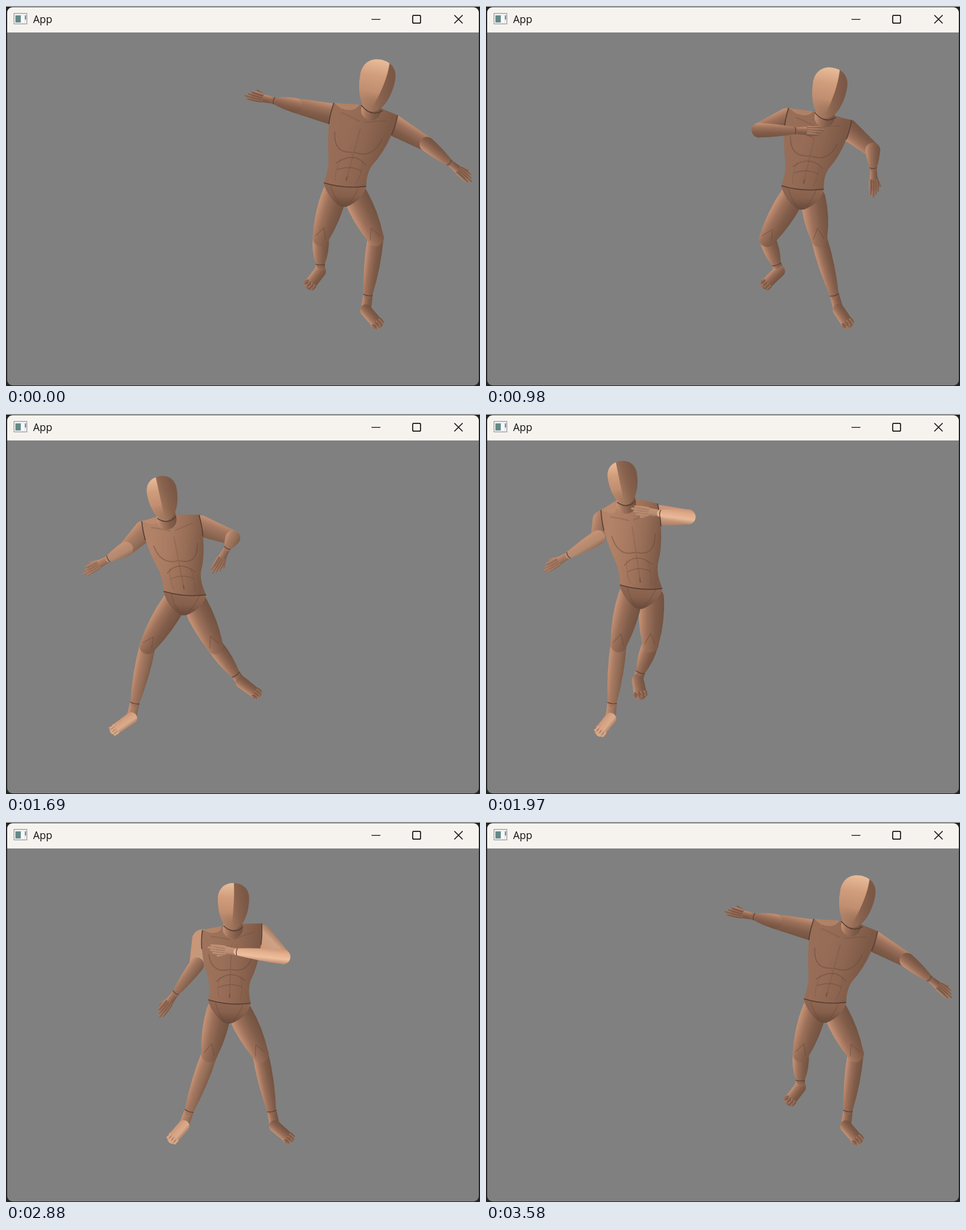
These frames come from a looping animation (804 px wide and 646 px high, 3650 ms). An HTML page with a canvas:

```html
<!DOCTYPE html>
<html lang="en">
<head>
<meta charset="utf-8">
<title>App</title>
<style>
  html, body { margin: 0; height: 100%; overflow: hidden; background: #242424; }
  canvas { display: block; }
</style>
</head>
<body>
<canvas id="stage" width="804" height="646"></canvas>
<script>
const ctx = document.getElementById('stage').getContext('2d');
const LOOP = 3650, DANCE = 3580;
const KEY_TIMES = [0, 980, 1410, 1970, 2530, 3160];

const mix = (a, b, k) => [a[0] + (b[0] - a[0]) * k, a[1] + (b[1] - a[1]) * k];
const shift = (p, x, y) => [p[0] + x, p[1] + y];
const clamp = k => Math.max(0, Math.min(1, k));
const direction = (a, b) => {
  const dx = b[0] - a[0], dy = b[1] - a[1], len = Math.hypot(dx, dy) || 1;
  return [dx / len, dy / len, len];
};

// Monotone cubic interpolation around the dance
function sample(values, time) {
  const n = values.length, t = time % DANCE;
  const wrap = i => (i + n) % n;
  const span = i => (KEY_TIMES[wrap(i + 1)] - KEY_TIMES[wrap(i)] + DANCE) % DANCE;
  const rise = i => (values[wrap(i + 1)] - values[wrap(i)]) / span(i);
  const slope = i => {
    const p = rise(i - 1), q = rise(i);
    return p * q > 0 ? 2 * p * q / (p + q) : 0;
  };
  const i = KEY_TIMES.findLastIndex(k => k <= t), h = span(i), k = (t - KEY_TIMES[i]) / h;
  return values[i] + rise(i) * h * k * k * (3 - 2 * k)
    + h * k * (1 - k) * ((1 - k) * slope(i) - k * slope(i + 1));
}

// Only the free joints are keyed; the rest of the body follows from them.
function poseAt(t) {
  const at = (...values) => sample(values, t);
  const chin = [at(619, 574, 347, 238, 286, 486), at(179, 191, 208, 154, 177, 185)];
  const hips = [at(575, 537, 381, 263, 301, 461), 232 + .4 * chin[1]];
  const elbowL = [at(490, 463, 236, 190, 254, 389), at(169, 211, 249, 210, 232, 247)];
  const wristL = [at(455, 524, 250, 140, 215, 355), at(161, 212, 252, 240, 268, 300)];
  const elbowR = [at(714, 656, 468, 343, 362, 588), at(235, 245, 246, 175, 205, 240)];
  const wristR = [at(752, 657, 505, 296, 294, 527), at(266, 275, 286, 169, 200, 238)];
  const kneeX = [at(534, 477, 277, 225, 298, 393), at(627, 565, 468, 279, 302, 552)];
  const ankleX = [at(533, 493, 231, 214, 299, 322), at(614, 591, 543, 262, 262, 597)];

  const lean = chin[0] - hips[0], right = chin[0] - 238;
  const chest = [hips[0] + .8 * lean, 50 + .7 * chin[1]];
  const half = 48 + .016 * right, tilt = 16 * clamp((chin[0] - 480) / 90) - 5.5;
  const hand = (elbow, wrist) => {
    const [dx, dy] = direction(elbow, wrist);
    return shift(wrist, dx * 49, dy * 49);
  };
  // The trailing foot leaves the floor as the weight moves away from it.
  const lift = [clamp((hips[0] - 470) / 60), clamp((345 - hips[0]) / 45)];
  const ankles = ankleX.map((x, i) => [x, 491 - 52 * lift[i]]);
  const toes = ankles.map(([x, y]) => {
    const out = .4 * (x - hips[0]);
    return [x + out, y + 35 + (y - 435) * .28 - .15 * Math.abs(out)];
  });
  return {
    chin, elbowL, wristL, elbowR, wristR, ankles, toes,
    crown: shift(chin, .4 * lean, -74 - .036 * right),
    shoulderL: shift(chest, -half, -tilt),
    shoulderR: shift(chest, half, tilt),
    hipL: shift(hips, -36, -3),
    hipR: shift(hips, 36, 3),
    handL: hand(elbowL, wristL),
    handR: hand(elbowR, wristR),
    knees: kneeX.map(x => [x, 303 + .3 * hips[1]]),
    facing: clamp((420 - chin[0]) / 150),
  };
}

const SHADED = [[198, 147, 117], [156, 112, 90], [128, 93, 74], [115, 82, 64]];
const LIT = [[205, 150, 118], [228, 176, 142], [238, 192, 158], [190, 138, 109]];

function gradient(a, b, colors) {
  const g = ctx.createLinearGradient(...a, ...b);
  colors.forEach((color, i) => g.addColorStop(i / (colors.length - 1), color));
  return g;
}

const skin = (a, b, glow) => gradient(a, b,
  SHADED.map((rgb, i) => `rgb(${rgb.map((c, j) => c + (LIT[i][j] - c) * glow)})`));

function line(points, color = '#5b4034', width = 1.3) {
  ctx.beginPath();
  ctx.moveTo(...points[0]);
  if (points.length === 3) ctx.quadraticCurveTo(...points[1], ...points[2]);
  else ctx.lineTo(...points[1]);
  ctx.strokeStyle = color;
  ctx.lineWidth = width;
  ctx.stroke();
}

// Tapered limb segment, lit from the upper left
function bone(a, b, ra, rb, bulge = 0, glow = 0) {
  const [dx, dy] = direction(a, b), angle = Math.atan2(dy, dx), q = Math.PI / 2;
  const m = mix(a, b, .5), r = (ra + rb) / 2 + 2 * bulge;
  ctx.beginPath();
  ctx.arc(...a, ra, angle + q, angle + 3 * q);
  ctx.quadraticCurveTo(m[0] + dy * r, m[1] - dx * r, b[0] + dy * rb, b[1] - dx * rb);
  ctx.arc(...b, rb, angle - q, angle + q);
  ctx.quadraticCurveTo(m[0] - dy * r, m[1] + dx * r, a[0] - dy * ra, a[1] + dx * ra);
  const s = Math.max(ra, rb) * (dx * .5 > dy * .85 ? 1 : -1);
  ctx.fillStyle = skin(shift(m, dy * s, -dx * s), shift(m, -dy * s, dx * s), glow);
  ctx.fill();
}

function seam(p, from, to, r) {
  const [dx, dy] = direction(from, to);
  line([shift(p, dy * r, -dx * r), shift(p, dx * 3, dy * 3), shift(p, -dy * r, dx * r)]);
}

function hand(wrist, tip, side, glow) {
  const [dx, dy] = direction(wrist, tip);
  const off = (p, k) => shift(p, -dy * k, dx * k);
  const knuckle = mix(wrist, tip, .45);
  bone(mix(wrist, tip, .2), off(mix(wrist, tip, .65), side * 10), 4, 2, 0, glow);
  bone(wrist, knuckle, 5.5, 7, 0, glow);
  for (let i = -1.5; i < 2; i++) {
    const end = mix(wrist, tip, 1 - Math.abs(i + .5 * side) * .09);
    bone(off(knuckle, i * 3.6), off(end, i * 4.2), 2.7, 1.7, .4, glow);
    if (i < 1) line([off(knuckle, i * 3.6 + 2), off(mix(wrist, tip, .8), i * 4 + 2)], '#5b4034a0', 1);
  }
}

function forearm(elbow, wrist, tip, side, glow) {
  hand(wrist, tip, side, glow * .5);
  bone(elbow, wrist, 12.5, 6, 1, glow);
  seam(wrist, elbow, wrist, 6);
}

function foot(ankle, knee, toe, glow) {
  const heel = shift(ankle, (ankle[0] - knee[0]) * .27, (ankle[1] - knee[1]) * .27);
  const [dx, dy] = direction(heel, toe), front = Math.abs(dy);
  bone(ankle, heel, 8, 8.5, 0, glow * .3);
  bone(heel, toe, 10, 6 + 5 * front, 0, glow);
  for (let i = -1.5; i < 2; i++) {
    const w = i * (2.6 + 3.4 * front);
    const p = shift(toe, -dy * w + dx * 4, dx * w + dy * 4);
    bone(shift(p, -dx * 5, -dy * 5), p, 3, 2.6, 0, glow);
    line([shift(p, -dx * 5 - dy * 2, -dy * 5 + dx * 2), shift(p, -dy * 2, dx * 2)], '#5b4034b0', 1);
  }
}

function leg(hip, knee, ankle, toe, glow) {
  foot(ankle, knee, toe, glow);
  bone(knee, ankle, 13.5, 7.5, 2.5, glow * .2);
  bone(hip, knee, 21, 14, 3);
  seam(ankle, knee, ankle, 8);
  const [kx, ky] = direction(hip, knee), peak = shift(knee, -kx * 18, -ky * 18);
  for (const r of [8, -10]) line([peak, shift(knee, ky * r, -kx * r)], '#5b403470', 1.2);
}

function torso(p, at) {
  const crotch = shift(mix(p.hipL, p.hipR, .48), 0, 37);
  const [sx, sy] = direction(p.shoulderL, p.shoulderR);
  const neck = shift(p.chin, 0, -8);
  const neckL = shift(neck, -19 * sx, -19 * sy), neckR = shift(neck, 19 * sx, 19 * sy);

  ctx.beginPath();
  ctx.moveTo(...p.hipL);
  ctx.quadraticCurveTo(...shift(p.hipL, 4, 20), ...shift(crotch, -10, -2));
  ctx.quadraticCurveTo(...shift(crotch, 0, 4), ...shift(crotch, 10, -2));
  ctx.quadraticCurveTo(...shift(p.hipR, -4, 20), ...p.hipR);
  ctx.fillStyle = gradient(mix(p.hipL, p.hipR, .5), crotch, ['#8f6752', '#87604c', '#684a3b']);
  ctx.fill();

  ctx.beginPath();
  ctx.moveTo(...p.shoulderL);
  ctx.quadraticCurveTo(...mix(p.shoulderL, neckL, .7), ...neckL);
  ctx.lineTo(...neckR);
  ctx.quadraticCurveTo(...mix(p.shoulderR, neckR, .7), ...p.shoulderR);
  ctx.lineTo(...at(1.04, .27));
  ctx.quadraticCurveTo(...at(1.05, .52), ...at(.93, .72));
  ctx.quadraticCurveTo(...at(.89, .84), ...p.hipR);
  ctx.quadraticCurveTo(...at(.5, 1.06), ...p.hipL);
  ctx.quadraticCurveTo(...at(.08, .82), ...at(.03, .68));
  ctx.quadraticCurveTo(...at(-.03, .5), ...at(-.04, .27));
  ctx.closePath();
  ctx.fillStyle = gradient(at(0, .4), at(1, .5), ['#986e58', '#966c56', '#8d6550', '#7c5946']);
  ctx.fill();
  ctx.fillStyle = gradient(at(0, .4), at(1, .5),
    [.5, .25, 0].map(a => `rgba(205, 152, 120, ${a * p.facing})`));
  ctx.fill();

  ctx.beginPath();
  ctx.moveTo(...p.shoulderL);
  ctx.lineTo(...neckL);
  ctx.quadraticCurveTo(...at(.33, .08), ...at(.12, .05));
  ctx.fillStyle = '#c3917390';
  ctx.fill();

  const muscle = '#62453870', faint = '#62453840', edge = '#563b30';
  for (const side of [-1, 1]) {
    const half = (u, v) => at(.5 + side * u, v);
    line([half(.42, .35), half(.39, .63), half(.01, .57)], muscle, 1.8);
    line([half(.22, .67), half(.3, .85), half(.24, .97)], faint);
    line([half(.37, .1), half(.2, .13), half(.04, .17)], faint, 2);
    line([half(.33, 1.03), shift(crotch, side * 17, -14), shift(crotch, side * 7, -4)], muscle);
    line([half(.5, 0), half(.54, .15), half(.54, .27)], edge, 1.6);
  }
  line([at(.5, .25), at(.5, .95)], faint, 1.6);
  line([at(.2, .74), at(.5, .55), at(.82, .72)], muscle, 1.6);
  line([at(.25, .82), at(.5, .74), at(.76, .8)], muscle, 1.4);
  line([at(.5, .89), at(.5, .95)], muscle, 2.4);
  line([p.hipL, at(.5, 1.06), p.hipR], edge, 1.6);
}

function head(crown, chin) {
  const [ux, uy, len] = direction(crown, chin);
  const at = (x, y) => shift(crown, (ux * y + uy * x) * len, (uy * y - ux * x) * len);
  const curve = (...points) => ctx.bezierCurveTo(...points.flat());

  bone(at(0, .72), at(0, .98), 15, 17);
  line([at(-.2, .92), at(.02, 1.12), at(.22, .94)], '#563b30', 1.5);

  ctx.save();
  ctx.beginPath();
  ctx.moveTo(...at(0, 0));
  curve(at(.21, 0), at(.345, .14), at(.335, .36));
  curve(at(.33, .68), at(.2, 1), at(0, 1));
  curve(at(-.2, 1), at(-.33, .68), at(-.335, .36));
  curve(at(-.345, .14), at(-.21, 0), at(0, 0));
  ctx.fillStyle = gradient(at(-.3, .6), at(.3, .5), ['#b4876c', '#a0765d', '#88624d', '#7a5846']);
  ctx.fill();
  ctx.clip();

  // The edge of the light drifts across the head with its place on the stage.
  const edge = (.34 + .001 * (crown[0] - 234) - .5) * .67;
  ctx.beginPath();
  ctx.moveTo(...at(edge, -.05));
  curve(at(edge + .03, .35), at(edge * .7, .6), at(-.02, 1.05));
  ctx.lineTo(...at(-.5, 1.05));
  ctx.lineTo(...at(-.5, -.05));
  ctx.fillStyle = gradient(at(0, 0), at(0, .95), ['#e9bd9b', '#d09d7c', '#c08e70', '#a87c6200']);
  ctx.fill();
  ctx.restore();
}

function figure(p) {
  const at = (u, v) => mix(mix(p.shoulderL, p.shoulderR, u), mix(p.hipL, p.hipR, u), v);
  const upperL = at(-.01, .14), upperR = at(1.01, .14);
  const glowL = clamp((p.elbowL[1] - upperL[1] - 25) / 20);
  const glowR = clamp((p.elbowR[0] - p.wristR[0]) / 50);
  const footGlow = .8 * clamp((450 - p.toes[0][0]) / 150);
  [[1, .75, 0], [0, .25, footGlow]].forEach(([i, u, glow]) =>
    leg(shift(at(u, 1), 0, 18), p.knees[i], p.ankles[i], p.toes[i], glow));
  bone(upperL, p.elbowL, 18, 12.5, 0, .7 * glowL);
  bone(upperR, p.elbowR, 18, 12.5, 0, .7 * glowR);
  torso(p, at);
  head(p.crown, p.chin);
  forearm(p.elbowL, p.wristL, p.handL, 1, .45 * p.facing);
  forearm(p.elbowR, p.wristR, p.handR, -1, glowR);
}

function rect(x, y, w, h, color) {
  ctx.fillStyle = color;
  ctx.fillRect(x, y, w, h);
}

function titleBar() {
  const ink = '#111';
  rect(0, 0, 804, 45, '#f6f2ed');
  rect(13, 12, 23, 19, '#8b9097');
  rect(14, 13, 21, 17, '#e9edf0');
  rect(16, 16, 9, 12, '#658a88');
  rect(26, 16, 5, 12, '#f8f8f8');
  rect(32, 16, 2, 7, '#658a88');
  ctx.fillStyle = ink;
  ctx.font = '17.5px "Open Sans", "Noto Sans", sans-serif';
  ctx.fillText('App', 46, 29);
  rect(620, 22, 15, 1.3, ink);
  ctx.strokeStyle = ink;
  ctx.lineWidth = 1.7;
  ctx.beginPath();
  ctx.roundRect(689.8, 15.8, 13.4, 13.4, 2);
  ctx.stroke();
  line([[760.5, 15.5], [774.5, 29.5]], ink, 1.6);
  line([[774.5, 15.5], [760.5, 29.5]], ink, 1.6);
}

function draw() {
  const now = performance.now() % LOOP;
  const t = now < 1410 ? Math.min(1330, Math.floor(now / 70) * 70)
    : Math.floor((now - 10) / 70) * 70 + 10;
  rect(0, 0, 804, 646, '#242424');
  rect(0, 0, 804, 1, '#e4e4e4');
  ctx.save();
  ctx.beginPath();
  ctx.roundRect(2, 2, 800, 643, 9);
  ctx.clip();
  rect(0, 45, 804, 601, '#808080');
  figure(poseAt(t));
  titleBar();
  ctx.restore();
  requestAnimationFrame(draw);
}
draw();
</script>
</body>
</html>
```
